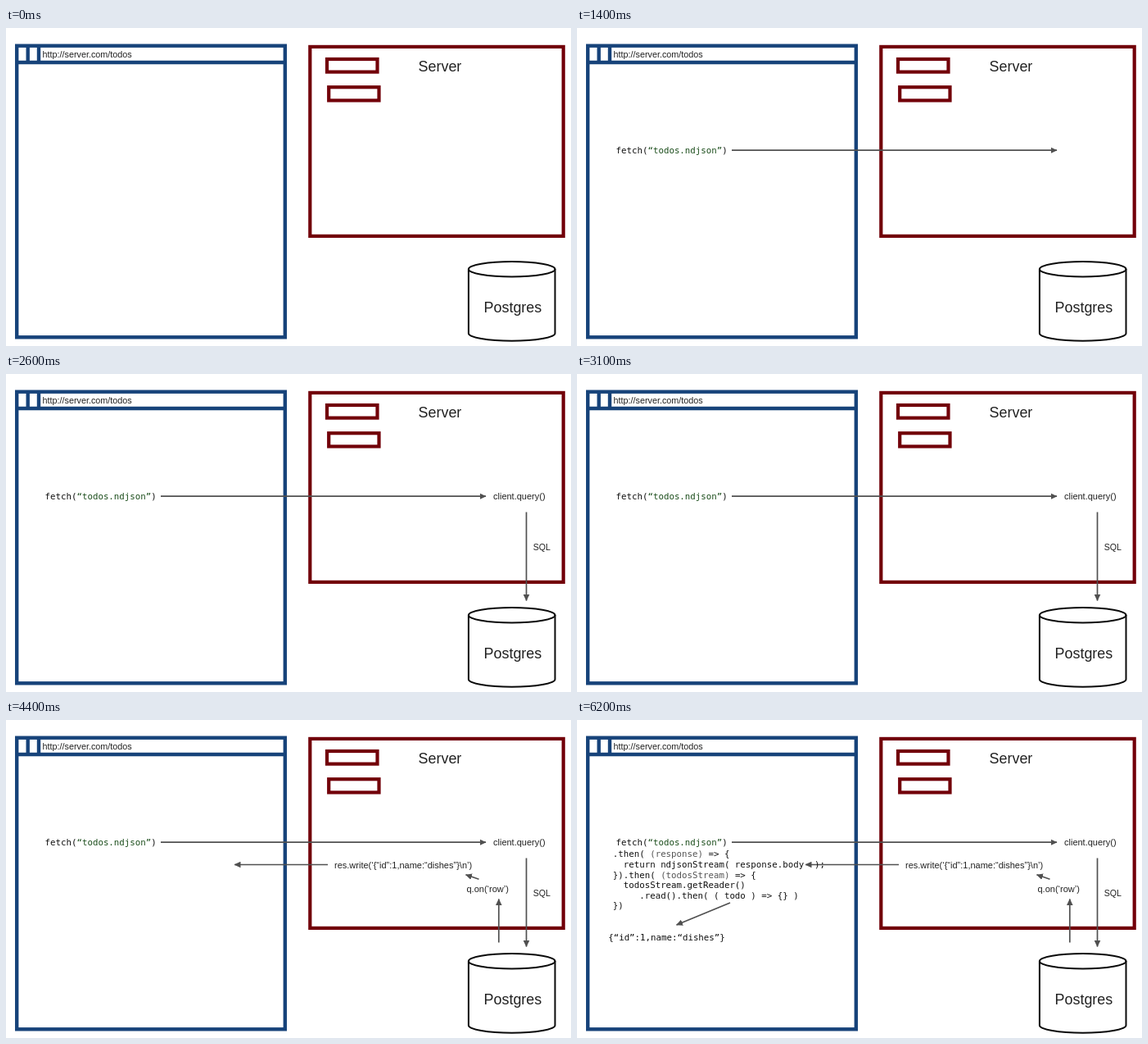
Recreate the animation shown at these times as an HTML page. Size 690 px wide and 388 px high, loop 8000 ms.

```html
<!DOCTYPE html>
<html lang="en">
<head>
<meta charset="utf-8">
<title>Streaming todos</title>
<style>
  html, body { margin: 0; width: 100%; height: 100%; overflow: hidden; background: #fff; }
  svg { display: block; width: 100%; height: 100%; }
  text { font: 11px "Liberation Sans", Arial, sans-serif; fill: #222; white-space: pre; }
  .title { font-size: 17.9px; }
  .url { font-size: 10.8px; }
  .code text { font: 10.77px "DejaVu Sans Mono", monospace; fill: #111; }
  .code .string { fill: #1b4d1b; }
  .code .param { fill: #555; }
  .browser, .server, .db { fill: none; }
  .browser { stroke: #17437a; stroke-width: 4.4; }
  .server { stroke: #720009; stroke-width: 4.2; }
  .db { stroke: #0a0a0a; stroke-width: 2; }
  .arrow { fill: none; stroke: #505050; stroke-width: 1.7; marker-end: url(#head); }

  /* One part of the request appears each second. */
  .step { animation: 8s step-end infinite; }
  .request { animation-name: request; }
  .query { animation-name: query; }
  .row { animation-name: row; }
  .write { animation-name: write; }
  .reader { animation-name: reader; }
  .result { animation-name: result; }
  @keyframes request { 0% { opacity: 0 } 15%, 100% { opacity: 1 } }
  @keyframes query { 0% { opacity: 0 } 27.5%, 100% { opacity: 1 } }
  @keyframes row { 0% { opacity: 0 } 40%, 100% { opacity: 1 } }
  @keyframes write { 0% { opacity: 0 } 52.5%, 100% { opacity: 1 } }
  @keyframes reader { 0% { opacity: 0 } 65%, 100% { opacity: 1 } }
  @keyframes result { 0% { opacity: 0 } 77.5%, 100% { opacity: 1 } }
</style>
</head>
<body>
<svg viewBox="0 0 690 388">
  <defs>
    <marker id="head" viewBox="0 0 8 8" refX="7.5" refY="4" markerWidth="8" markerHeight="8"
            markerUnits="userSpaceOnUse" orient="auto">
      <path d="M0 0.2L8 4L0 7.8Z" fill="#505050"/>
    </marker>
  </defs>

  <g class="browser">
    <rect x="13.2" y="21.7" width="327.6" height="355.6"/>
    <path d="M13 42H341M26.7 22V42M40 22V42"/>
  </g>
  <text class="url" x="44.5" y="36">http://server.com/todos</text>

  <g class="server">
    <rect x="371.3" y="22.9" width="309.4" height="231"/>
    <rect x="392" y="38" width="61.5" height="15.6"/>
    <rect x="394.2" y="72.2" width="61.3" height="16.2"/>
  </g>
  <text class="title" x="503.6" y="53">Server</text>

  <g class="db">
    <ellipse cx="617.7" cy="294.2" rx="52.8" ry="9.2"/>
    <path d="M564.9 294V372.5A52.8 9.2 0 0 0 670.5 372.5V294"/>
  </g>
  <text class="title" x="583.6" y="347">Postgres</text>

  <g class="step request code">
    <text x="47.6" y="152.8">fetch(<tspan class="string">“todos.ndjson”</tspan>)</text>
    <path class="arrow" d="M189 149.2H586"/>
  </g>

  <g class="step query">
    <text x="595" y="152.8">client.query()</text>
    <text x="643.8" y="214.5" style="font-size:10.6px">SQL</text>
    <path class="arrow" d="M635.5 168.5V276.5"/>
  </g>

  <g class="step row">
    <text x="562.5" y="210.3">q.on(‘row’)</text>
    <path class="arrow" d="M601.8 271.5V218.5"/>
  </g>

  <g class="step write">
    <text x="401" y="180.5">res.write(‘{“id”:1,name:“dishes”}\n’)</text>
    <path class="arrow" d="M577.5 194.2L561.5 188.8"/>
    <path class="arrow" d="M393 176.5H279"/>
  </g>

  <g class="step reader code">
    <text x="43.8" y="167.3">.then( <tspan class="param">(response)</tspan> =&gt; {</text>
    <text x="43.8" y="180">  return ndjsonStream( response.body  );</text>
    <text x="43.8" y="192.6">}).then( <tspan class="param">(todosStream)</tspan> =&gt; {</text>
    <text x="43.8" y="205.2">  todosStream.getReader()</text>
    <text x="43.8" y="217.8">     .read().then( ( todo ) =&gt; {} )</text>
    <text x="43.8" y="230.4">})</text>
  </g>

  <g class="step result code">
    <text x="38.2" y="268.6">{“id”:1,name:“dishes”}</text>
    <path class="arrow" d="M187 223L121.5 250"/>
  </g>
</svg>
</body>
</html>
```
